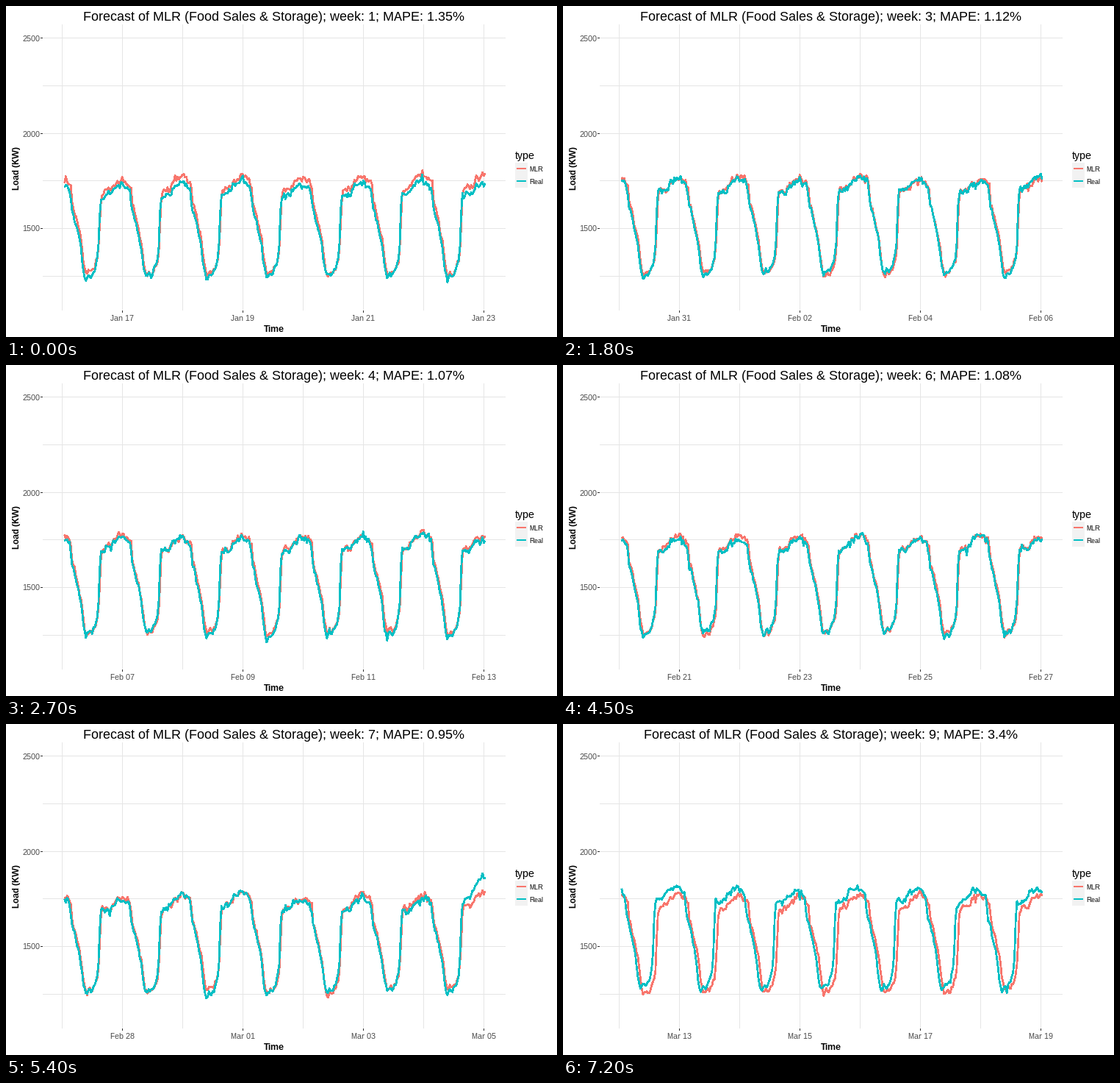
These frames come from a looping animation (750 by 450 pixels, 8000 ms). A matplotlib script:

```python
import numpy as np
import matplotlib.pyplot as plt
from matplotlib.animation import FuncAnimation
from matplotlib.patches import Rectangle

W, H, DPI = 750, 450, 100
STEP_MS, STEPS, HOLD = 100, 80, 9
RED, TEAL = "#F8766D", "#00BFC4"
GRID, TICK, LABEL = "#E5E5E5", "#333333", "#4D4D4D"
X0, DAY_W = 76.5, 82.0
LABEL_DAYS = (1, 3, 5, 7)
MONTHS = "Jan Feb Mar".split()

MAPE = [1.35, 1.24, 1.12, 1.07, 1.02, 1.08, 0.95, 1.62, 3.4]
BIAS = [28, 12, 3, 10, 17, 10, 8, 0, -35]  # mean MLR minus Real, kW

# Shape of one day: hour and share of the range from low to peak
DAY_KEYS = [
    (0, 1), (1, .96), (2, .96), (3.2, .9), (3.7, .74), (5, .62), (7.3, .36),
    (8.5, .1), (9.4, 0), (10.5, .05), (11.4, .03), (12.9, .1), (13.8, .17),
    (14.4, .3), (15, .72), (15.4, .85), (19, .88), (20.3, .95), (24, 1),
]
HOURS, SHARES = np.array(DAY_KEYS).T


def y_px(kw):
    return 302.5 - (kw - 1500) * 0.2587


def week_data(week):
    """Pixel x of each half hour, with pixel y of the MLR and Real loads."""
    rng = np.random.default_rng(100 + week)
    t = (np.arange(336) + 1.9) / 48
    mlr_peak = rng.normal(1775, 9, 8)
    real_peak = mlr_peak - BIAS[week - 1] + rng.normal(0, 8, 8)
    shared = rng.normal(0, 8, t.size)

    def load(peaks, shift, lift):
        share = np.interp((t + shift) * 24 % 24, HOURS, SHARES)
        peak = np.interp(t, range(8), peaks)
        low = np.interp(t, np.arange(7) + 0.4, rng.normal(1249 + lift, 9, 7))
        rough = (0.7 + 0.3 * share) * (shared + rng.normal(0, 6, t.size))
        return low + share * (peak - low) + rough, share

    mlr, _ = load(mlr_peak, -0.01, 0)
    # The last week runs an hour early: clocks change, the forecast lags
    real, share = load(real_peak, 1 / 24 if week == 9 else 0, -0.4 * BIAS[week - 1])
    # Surge in demand on the night the eighth week starts
    day = t + 7 * (week - 1)
    real += 120 * share ** 2 * np.exp(-((day - 49.4) / 0.8) ** 2)
    return X0 + t * DAY_W, y_px(mlr), y_px(real)


def day_label(days):
    date = str(np.datetime64("2012-01-16") + np.timedelta64(days, "D"))
    return f"{MONTHS[int(date[5:7]) - 1]} {date[8:]}"


plt.rcParams.update({
    "font.family": "Liberation Sans",
    "text.hinting": "native",
    "text.hinting_factor": 1,
})
fig = plt.figure(figsize=(W / DPI, H / DPI), dpi=DPI, facecolor="white")
ax = fig.add_axes([0, 0, 1, 1])
ax.set(xlim=(0, W), ylim=(H, 0))
ax.axis("off")


def line(x, y, color, px=1, z=1):
    return ax.plot(x, y, color=color, lw=px * 72 / DPI, antialiased=False, snap=False,
                   solid_capstyle="butt", solid_joinstyle="round", zorder=z)[0]


def text(x, y, s, px, color="black", ha="left", **kw):
    return ax.text(x, y, s, fontsize=px * 72 / DPI, color=color, ha=ha,
                   va="baseline", **kw)


for k, kw in enumerate(range(2500, 1200, -250)):
    y = np.floor(y_px(kw)) + 0.5
    line([50, 680], [y, y], GRID)
    if k % 2 == 0:
        line([47, 50], [y, y], TICK)
        text(46.5, y + 4, str(kw), 11, LABEL, "right")
for k in range(8):
    x = X0 + k * DAY_W
    line([x, x], [25, 414], GRID)
    if k in LABEL_DAYS:
        line([x, x], [414, 417], TICK)

text(365, 443, "Time", 12, ha="center", weight="bold")
text(18, 221, "Load (KW)", 12, ha="center", weight="bold",
     rotation=90, rotation_mode="anchor")
text(693, 208, "type", 15)
ax.add_patch(Rectangle((693, 213), 17, 34, fc="#F2F2F2", ec="none"))
for name, color, y in (("MLR", RED, 221), ("Real", TEAL, 238)):
    line([695, 708], [y, y], color, 2, 2)
    text(712, y + 4, name, 9)

title = text(364.5, 20, "", 18, ha="center")
days = [text(X0 - 0.5 + d * DAY_W, 428.5, "", 11, LABEL, "center") for d in LABEL_DAYS]
mlr_line = line([], [], RED, 1.7, 3)
real_line = line([], [], TEAL, 1.7, 4)


def update(i):
    week = min(i // HOLD, 8) + 1
    title.set_text(f"Forecast of MLR (Food Sales & Storage); week: {week}; MAPE: {MAPE[week - 1]}%")
    for label, d in zip(days, LABEL_DAYS):
        label.set_text(day_label(7 * (week - 1) + d))
    x, mlr, real = week_data(week)
    mlr_line.set_data(x, mlr)
    real_line.set_data(x, real)
    return [title, *days, mlr_line, real_line]


anim = FuncAnimation(fig, update, frames=STEPS, interval=STEP_MS, repeat=True, repeat_delay=0)
plt.show()
```
